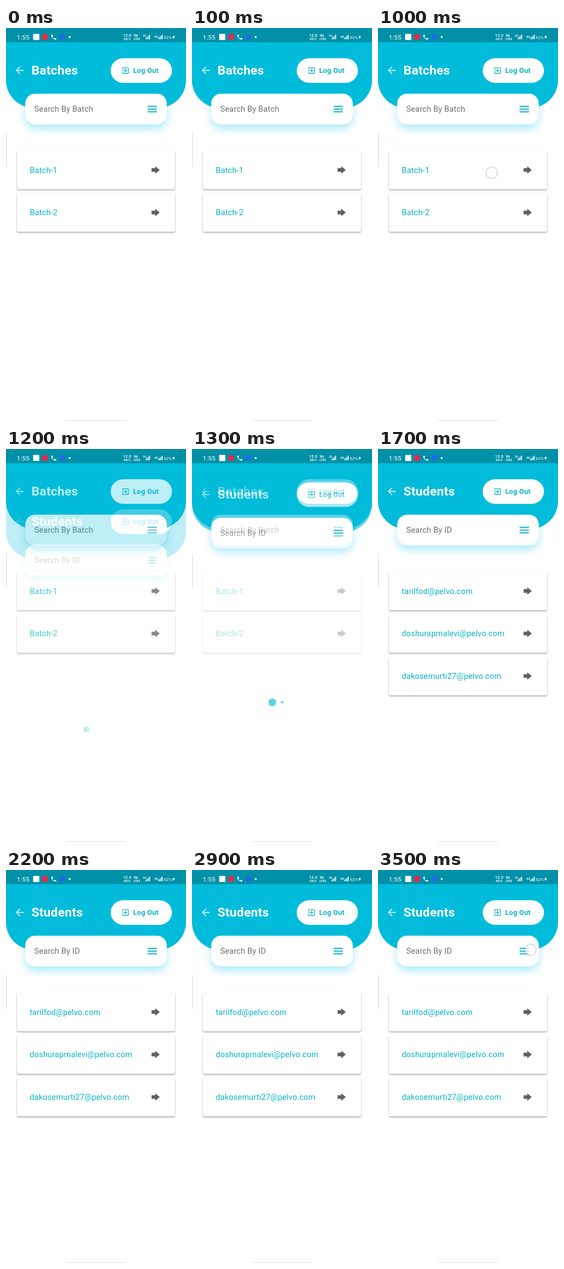
An HTML page with a canvas that plays this animation: 328x718 px, repeating every 3600 ms.

```html
<!DOCTYPE html>
<html lang="en">
<head>
<meta charset="utf-8">
<title>Batches</title>
<style>
  html, body { margin: 0; width: 100%; height: 100%; overflow: hidden; background: #fff; }
  canvas { display: block; width: 328px; height: 718px; }
</style>
</head>
<body>
<canvas id="stage" width="328" height="718"></canvas>
<script>
const W = 328, H = 718, LOOP = 3600;
const CYAN = '#00bcda', TEAL = '#0bb4c5', FONT = 'Roboto, Arial, sans-serif';
const BACK = 'M20 11H7.83l5.59-5.59L12 4l-8 8 8 8 1.41-1.41L7.83 13H20v-2z';
const EXIT = 'M10.09 15.59L11.5 17l5-5-5-5-1.41 1.41L12.67 11H3v2h9.67l-2.58 2.59z' +
  'M19 3H5c-1.11 0-2 .9-2 2v4h2V5h14v14H5v-4H3v4c0 1.1.89 2 2 2h14c1.1 0 2-.9 2-2V5c0-1.1-.9-2-2-2z';
const PHONE = 'M6.62 10.79c1.44 2.83 3.76 5.14 6.59 6.59l2.2-2.2c.27-.27.67-.36 1.02-.24 ' +
  '1.12.37 2.33.57 3.57.57.55 0 1 .45 1 1V20c0 .55-.45 1-1 1-9.39 0-17-7.61-17-17 ' +
  '0-.55.45-1 1-1h3.5c.55 0 1 .45 1 1 0 1.25.2 2.45.57 3.57.11.35.03.74-.25 1.02l-2.2 2.2z';
const BOLT = 'M14 2L4 14h6l-2 8 11-13h-7z';

function text(c, str, x, y, size, color, weight = 400, spacing = 0) {
  c.font = `${weight} ${size}px ${FONT}`;
  c.letterSpacing = spacing + 'px';
  c.fillStyle = color;
  c.fillText(str, x, y);
}

function box(c, x, y, w, h, r, color) {
  c.beginPath();
  c.roundRect(x, y, w, h, r);
  c.fillStyle = color;
  c.fill();
}

function dot(c, x, y, r, color) {
  c.beginPath();
  c.arc(x, y, r, 0, Math.PI * 2);
  c.fillStyle = color;
  c.fill();
}

// Draws a 24-unit icon centred on x, y.
function icon(c, path, x, y, scale, color) {
  c.save();
  c.translate(x - 12 * scale, y - 12 * scale);
  c.scale(scale, scale);
  c.fillStyle = color;
  c.fill(new Path2D(path));
  c.restore();
}

function shadowBox(c, x, y, w, h, r, dy, blur, color) {
  c.save();
  c.shadowOffsetY = dy;
  c.shadowBlur = blur;
  c.shadowColor = color;
  box(c, x, y, w, h, r, '#fff');
  c.restore();
}

function card(c, y, label) {
  shadowBox(c, 20, y, 288, 70.5, 3, 1, 3, 'rgba(0,0,0,.15)');
  shadowBox(c, 20, y, 288, 70.5, 3, 2, 3, 'rgba(0,0,0,.24)');
  text(c, label, 43.2, y + 40.7, 14.58, TEAL, 400, .14);
  const m = y + 35.4;
  c.beginPath();
  [[265.3, -3.3], [272, -3.3], [272, -6.9], [280.2, 0], [272, 6.9], [272, 3.3], [265.3, 3.3]]
    .forEach(([px, py]) => c.lineTo(px, m + py));
  c.fillStyle = '#616161';
  c.fill();
}

function makePage(title, hint, rows) {
  const page = document.createElement('canvas');
  page.width = W;
  page.height = H;
  const c = page.getContext('2d');
  box(c, 0, 0, W, H, 0, '#fff');
  box(c, 0, 0, W, 145.7, [0, 0, 50, 50], CYAN);
  icon(c, BACK, 25, 77.5, .911, 'rgba(255,255,255,.78)');
  text(c, title, 46.4, 85.3, 22.8, '#fff', 700, .23);
  box(c, 190.8, 55.2, 111.6, 45, 22.5, '#fff');
  icon(c, EXIT, 217.8, 77.8, .65, TEAL);
  text(c, 'Log Out', 231.7, 82.2, 12.76, TEAL, 700, .23);
  shadowBox(c, 35, 120, 258, 56.2, 18, 8, 15, 'rgba(0,190,240,.32)');
  text(c, hint, 51.4, 153.3, 14.58, '#707070', 400, .14);
  for (let i = -1; i < 2; i++) box(c, 258, 147.2 + i * 5, 17, 2, 0, TEAL);
  rows.forEach((label, i) => card(c, 224 + i * 77.7, label));
  return page;
}

function bars(c, x, n) {
  for (let i = 0; i < n; i++) {
    const h = 2.5 + i * 2;
    box(c, x + i * 2.2, 20.5 - h, 1.4, h, 0, '#fff');
  }
}

function statusBar(c) {
  box(c, 0, 0, W, 26, 0, 'rgba(0,0,0,.235)');
  text(c, '1:55', 19.6, 20.7, 11.8, '#fff', 400, .1);
  box(c, 49.5, 10.7, 11.2, 11.2, 1, '#fff');
  box(c, 66, 11.3, 10.2, 10.2, 1.5, '#e8284c');
  icon(c, PHONE, 87, 16.7, .5, '#fff');
  dot(c, 103, 16.4, 5, '#2866ee');
  dot(c, 116, 16.6, 1.8, '#fff');
  text(c, '12.0', 213.3, 16.3, 7.6, '#fff', 500);
  text(c, 'KB/S', 214.5, 22.2, 5.4, '#fff', 500);
  text(c, 'Vo', 232.8, 16.2, 6.4, '#fff', 700);
  text(c, 'LTE2', 232.6, 22, 5.4, '#fff', 700);
  text(c, '2G', 249.3, 16.2, 5.4, '#fff', 500);
  bars(c, 254.4, 4);
  text(c, '4G', 270, 17.6, 6.2, '#fff', 500);
  bars(c, 277.5, 4);
  text(c, '62%', 287.8, 19.6, 7.6, '#fff', 400);
  icon(c, BOLT, 305.7, 16.6, .38, '#fff');
}

function bezier(x1, y1, x2, y2) {
  const at = (a, b, s) => 3 * (1 - s) * s * ((1 - s) * a + s * b) + s ** 3;
  return x => {
    if (x <= 0 || x >= 1) return x <= 0 ? 0 : 1;
    let lo = 0, hi = 1;
    for (let i = 0; i < 30; i++) {
      const mid = (lo + hi) / 2;
      if (at(x1, x2, mid) < x) lo = mid; else hi = mid;
    }
    return at(y1, y2, lo);
  };
}

const slideEase = bezier(.4, 0, .2, 1), fadeEase = bezier(.42, 0, 1, 1);
const ctx = document.getElementById('stage').getContext('2d');
const batches = makePage('Batches', 'Search By Batch', ['Batch-1', 'Batch-2']);
const loading = makePage('Students', 'Search By ID', []);
const students = makePage('Students', 'Search By ID',
  ['tarilfod@pelvo.com', 'doshurapmalevi@pelvo.com', 'dakosemurti27@pelvo.com']);

const PUSH = 1068, PUSH_TIME = 300, LOADED = 1600;

function loader(t) {
  const phase = (t - 1117) / 1400;
  for (let i = 0; i < 3; i++) {
    const s = (Math.sin((phase - i * .2) * Math.PI * 2) + 1) / 2;
    dot(ctx, 146.3 + i * 18, 457.2, 8.2 * s, '#10bbce');
  }
}

function touch(x, y) {
  dot(ctx, x, y, 10.4, 'rgba(255,255,255,.65)');
  ctx.strokeStyle = 'rgba(0,0,0,.19)';
  ctx.lineWidth = 1.3;
  ctx.stroke();
}

function draw(t) {
  const p = (t - PUSH) / PUSH_TIME;
  if (p < 1) ctx.drawImage(batches, 0, 0);
  if (p > 0) {
    ctx.save();
    ctx.globalAlpha = fadeEase(p);
    ctx.translate(0, H / 4 * (1 - slideEase(p)));
    ctx.drawImage(t < LOADED ? loading : students, 0, 0);
    if (t < LOADED) loader(t);
    ctx.restore();
  }
  statusBar(ctx);
  box(ctx, 0, 192, 1.6, 62, [0, 1, 1, 0], '#e4e4e4');
  box(ctx, 109, 716.8, 110, 1.2, 0, '#e4e4e4');
  if (t >= 1000 && t < 1100) touch(207.2, 264.5);
  if (t >= 3500) touch(277.8, 146);
}

function tick() {
  draw(performance.now() % LOOP);
  requestAnimationFrame(tick);
}
tick();
</script>
</body>
</html>
```
